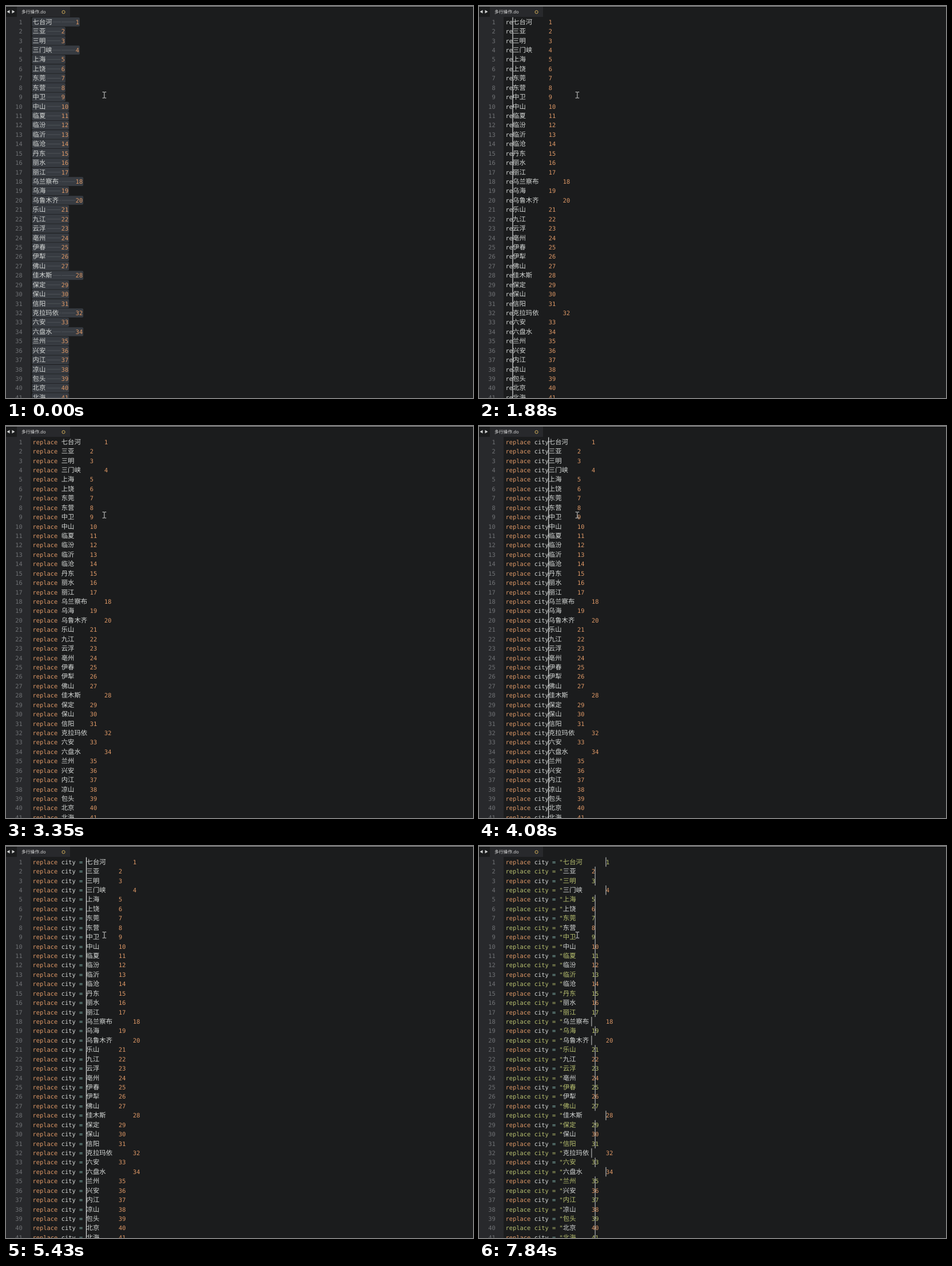
These frames come from a looping animation (817x686 px, 7990 ms). An HTML page:

```html
<!DOCTYPE html>
<html lang="zh-CN">
<head>
<meta charset="utf-8">
<style>
  html, body { margin: 0; width: 100%; height: 100%; overflow: hidden; background: #1b1c1d; }
  svg { display: block; }
  text { white-space: pre; text-rendering: geometricPrecision; }
  .mono { font: 10.41px "DejaVu Sans Mono", "Noto Sans Mono", monospace; }
  .cjk { font: 11.4px "Noto Sans CJK SC", "Noto Sans CJK", sans-serif; }
  .title { font: 7.8px "Open Sans", "Noto Sans CJK SC", "Noto Sans CJK", sans-serif; }
</style>
</head>
<body>
<svg id="stage" width="817" height="686" viewBox="0 0 817 686">
  <rect width="817" height="686" fill="#1b1c1d"/>
  <rect y="19" width="43" height="667" fill="#28292c"/>
  <path d="M19 19V1H112V19Z" fill="#28292c"/>
  <rect width="817" height="1" fill="#9b9b9b"/>
  <path d="M1.5 10L6.5 7V13ZM15.5 10L10.5 7V13Z" fill="#d2d3d3"/>
  <text class="title" x="27" y="13" fill="#e0e1e1">多行操作.do</text>
  <circle cx="100.6" cy="10.6" r="2.6" fill="none" stroke="#d9b45c" stroke-width="1"/>
  <g id="rows"></g>
  <path d="M168.7 150.6H171.2L172 151.3L172.8 150.6H175.3M172 151.3V160.3M168.7 161H171.2L172 160.3L172.8 161H175.3"
        fill="none" stroke="#d8d8d8" stroke-width="1"/>
</svg>
<script>
const LOOP = 7990;
const LEFT = 46.5, TOP = 19.7, PITCH = 16.43, CHAR = 6.27, WIDE = 11.4, TAB = 4 * CHAR;
const COLOR = {
  plain: '#d6d9d7', number: '#de9866', keyword: '#de9866', operator: '#8abeb7',
  string: '#b9c170', gutter: '#707275', selection: '#373b41', caret: '#d4d6d6'
};
const COMMAND = 'replace city = "';
const CITIES = ('七台河 三亚 三明 三门峡 上海 上饶 东莞 东营 中卫 中山 临夏 临汾 临沂 临沧 丹东 丽水 丽江 ' +
  '乌兰察布 乌海 乌鲁木齐 乐山 九江 云浮 亳州 伊春 伊犁 佛山 佳木斯 保定 保山 信阳 克拉玛依 六安 六盘水 ' +
  '兰州 兴安 内江 凉山 包头 北京 北海').split(' ');

// Each step changes some of: typed characters, caret moves to the right, caret opacity, selection.
const STEPS = [
  [0, { typed: 0, moves: 0, alpha: 0, selected: true }],
  [150, { moves: Infinity, alpha: 1, selected: false }],
  [550, { moves: 0 }],
  [850, { alpha: .5 }], [970, { alpha: 0 }], [1090, { alpha: 1 }],
  [1490, { alpha: .5 }], [1610, { alpha: 0 }],
  [1730, { typed: 1, alpha: 1 }], [1880, { typed: 2 }], [2130, { typed: 5 }],
  [2590, { typed: 7 }], [2840, { typed: 8 }],
  [3230, { alpha: .5 }], [3350, { alpha: 0 }],
  [3510, { typed: 9, alpha: 1 }], [3780, { typed: 10 }], [3930, { typed: 11 }],
  [4080, { typed: 12 }], [4330, { typed: 13 }],
  [4640, { alpha: .5 }], [4760, { alpha: 0 }],
  [5280, { typed: 14, alpha: 1 }], [5430, { typed: 15 }], [5890, { typed: 16 }],
  [6310, { alpha: .5 }], [6460, { alpha: 0 }],
  [6770, { moves: 1, alpha: 1 }], [7020, { moves: 2 }], [7140, { moves: 3 }],
  [7260, { moves: 4 }], [7560, { moves: 5 }], [7840, { alpha: .75 }]
];

function set(node, attrs) {
  for (const key in attrs) node.setAttribute(key, attrs[key]);
}

function add(parent, tag, attrs, content = '') {
  const node = document.createElementNS('http://www.w3.org/2000/svg', tag);
  set(node, attrs);
  node.textContent = content;
  return parent.appendChild(node);
}

const nextTab = x => (Math.floor(x / TAB + 1e-6) + 1) * TAB;

// Every caret position of a line, from the start of the city name to the line end.
function caretStops(city, number, typed) {
  const stops = [typed * CHAR];
  const last = () => stops[stops.length - 1];
  for (const _ of city) stops.push(last() + WIDE);
  stops.push(nextTab(last()));
  stops.push(nextTab(last()));
  for (const _ of number) stops.push(last() + CHAR);
  return stops;
}

const layer = document.getElementById('rows');
const rows = CITIES.map((city, i) => {
  const number = String(i + 1), y = TOP + i * PITCH, base = y + 12;
  const group = add(layer, 'g', {});
  add(group, 'text', { class: 'mono', x: 28.8, y: base, 'text-anchor': 'end', fill: COLOR.gutter }, number);
  const box = add(group, 'rect', { x: LEFT - 1, y: y + .3, height: PITCH - .8, rx: 2, fill: COLOR.selection });
  const tabs = add(group, 'path', { stroke: '#54585e', 'stroke-width': .8 });
  let column = 0;
  const words = COMMAND.match(/[^ ]+ ?/g).map(word => {
    const item = { word, column };
    item.node = add(group, 'text', { class: 'mono', x: LEFT + column * CHAR, y: base });
    column += word.length;
    return item;
  });
  return {
    city, number, y, box, tabs, words, odd: i % 2 === 0,
    name: add(group, 'text', { class: 'cjk', y: base }, city),
    value: add(group, 'text', { class: 'mono', y: base }, number),
    caret: add(group, 'rect', { y, width: 1.3, height: PITCH + .1, fill: COLOR.caret })
  };
});

const WORD_COLORS = [COLOR.keyword, COLOR.plain, COLOR.operator, COLOR.string];

function drawRow(row, { typed, moves, alpha, selected }) {
  const stops = caretStops(row.city, row.number, typed);
  const end = stops[stops.length - 1];
  const nameEnd = LEFT + stops[row.city.length];
  const tabEnd = LEFT + stops[row.city.length + 1];
  const valueX = LEFT + stops[row.city.length + 2];
  // An unclosed quote runs on to the next line, so strings alternate between lines.
  const quoted = typed === COMMAND.length;
  const inString = quoted && row.odd;

  row.words.forEach(({ word, column, node }, k) => {
    node.textContent = word.slice(0, Math.max(0, typed - column));
    let fill = WORD_COLORS[k];
    if (k === 0 && typed < word.length) fill = COLOR.plain;
    if (quoted && !row.odd) fill = COLOR.string;
    set(node, { fill });
  });
  set(row.name, { x: LEFT + stops[0], fill: inString ? COLOR.string : COLOR.plain });
  set(row.value, { x: valueX, fill: inString ? COLOR.string : COLOR.number });
  set(row.box, { width: end + 2, opacity: +selected });
  const mid = row.y + PITCH / 2;
  set(row.tabs, {
    d: `M${nameEnd + 1} ${mid}H${tabEnd - .5}M${tabEnd + .5} ${mid}H${valueX - 1}`,
    opacity: +selected
  });
  const caretX = LEFT + stops[Math.min(moves, stops.length - 1)];
  set(row.caret, { x: caretX - .65, opacity: alpha });
}

let shown = -1;
function render(time) {
  const t = time % LOOP;
  const passed = STEPS.filter(([at]) => at <= t);
  if (passed.length !== shown) {
    shown = passed.length;
    const state = Object.assign({}, ...passed.map(step => step[1]));
    rows.forEach(row => drawRow(row, state));
  }
}

const start = performance.now();
function tick() {
  render(performance.now() - start);
  requestAnimationFrame(tick);
}
tick();
</script>
</body>
</html>
```
